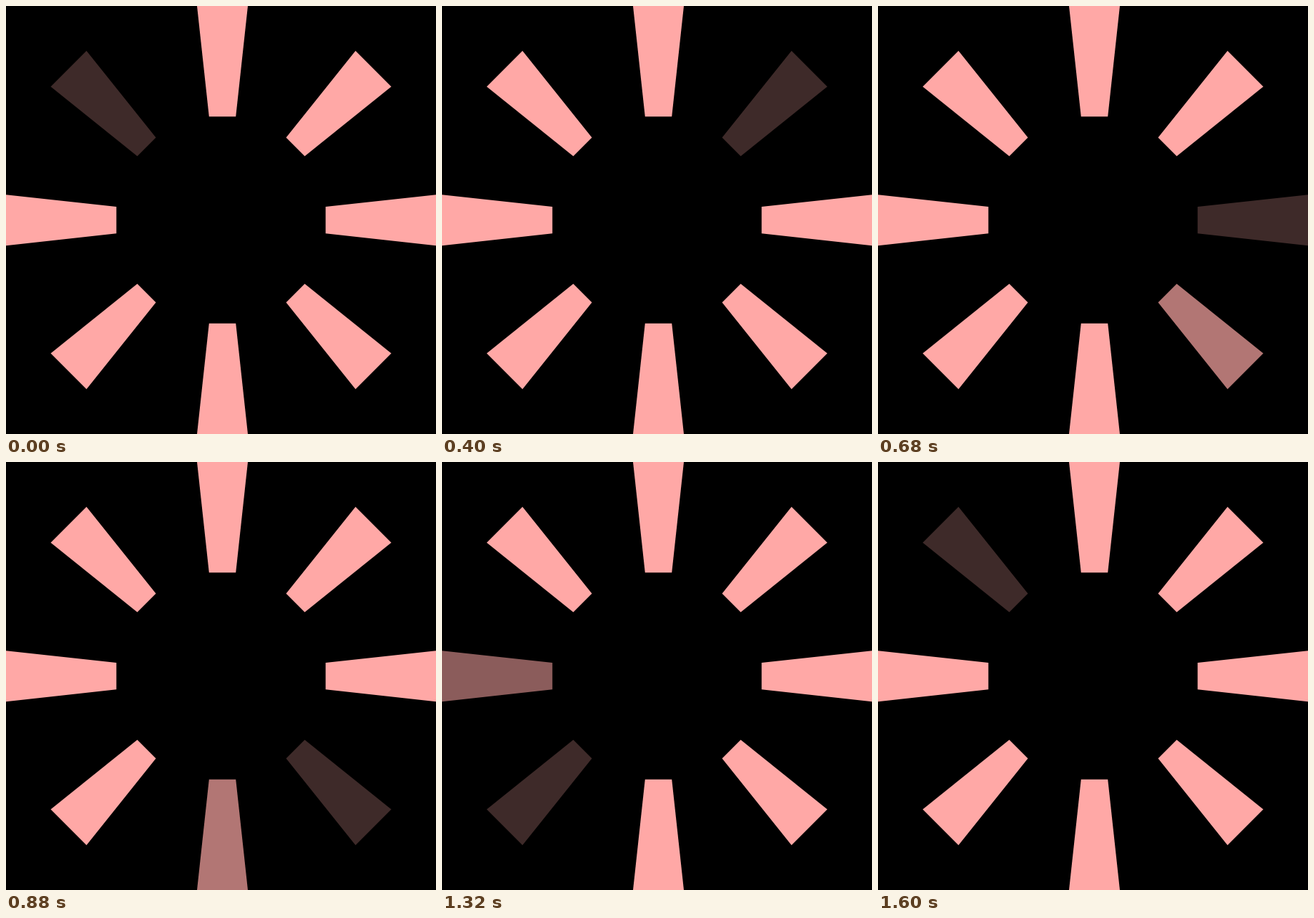
An HTML page with a canvas for the animation above (1640 ms loop, 601 by 597 pixels).

```html
<!DOCTYPE html>
<html lang="en">
<head>
<meta charset="utf-8">
<title>Loading spinner</title>
<style>
  html, body { margin: 0; width: 100%; height: 100%; overflow: hidden; background: #000; }
  canvas { display: block; }
</style>
</head>
<body>
<canvas id="stage" width="601" height="597"></canvas>
<script>
const WIDTH = 601, HEIGHT = 597;
const STEP_MS = 40, STEPS = 41, STEPS_PER_RAY = 5;
const LIGHT = [255, 168, 166], DARK = [62, 42, 41];
const ctx = document.getElementById('stage').getContext('2d');

const flipX = ray => ray.map(([x, y]) => [WIDTH - x, y]);
const flipY = ray => ray.map(([x, y]) => [x, HEIGHT - y]);

const northWest = [[112.5, 62.5], [209.5, 183.5], [183.5, 209.5], [62.5, 112.5]];
const north = [[267, 0], [338, 0], [321.2, 154.2], [283.8, 154.2]];
const west = [[0, 263.2], [154.3, 280], [154.3, 317.3], [0, 334.2]];
const northEast = flipX(northWest);

// Clockwise from the upper left
const rays = [
  northWest, north, northEast, flipX(west),
  flipY(northEast), flipY(north), flipY(northWest), west
];

function shade(darkness) {
  const channels = LIGHT.map((v, i) => Math.round(v + (DARK[i] - v) * darkness));
  return `rgb(${channels.join(',')})`;
}

function fillRay(ray, darkness) {
  ctx.fillStyle = shade(darkness);
  ctx.beginPath();
  ray.forEach(([x, y]) => ctx.lineTo(x, y));
  ctx.closePath();
  ctx.fill();
}

function draw() {
  const step = Math.floor(performance.now() / STEP_MS) % STEPS;
  const current = Math.floor(step / STEPS_PER_RAY) % rays.length;
  const next = (current + 1) % rays.length;
  const fade = (step % STEPS_PER_RAY) / STEPS_PER_RAY;

  ctx.fillStyle = '#000';
  ctx.fillRect(0, 0, WIDTH, HEIGHT);
  rays.forEach((ray, i) => fillRay(ray, i === current ? 1 : i === next ? fade : 0));
  requestAnimationFrame(draw);
}

draw();
</script>
</body>
</html>
```
